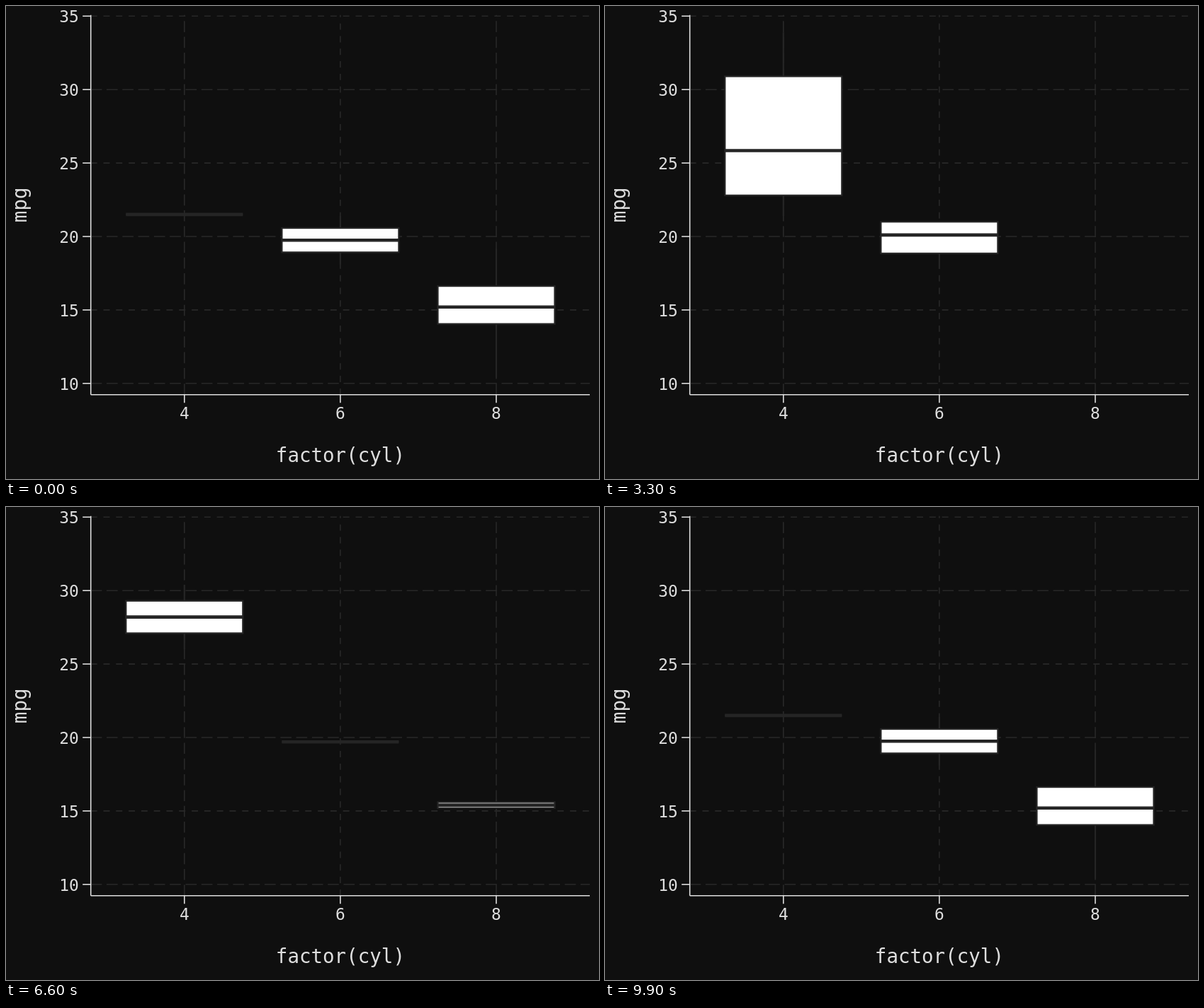
These frames come from a looping animation (837 by 669 pixels, 10 s). An HTML page with a canvas:

```html
<!DOCTYPE html>
<html lang="en">
<head>
<meta charset="utf-8">
<title>Box plots</title>
<style>
  html, body { margin: 0; width: 100%; height: 100%; overflow: hidden; background: #0f0f0f; }
  canvas { display: block; }
</style>
</head>
<body>
<canvas id="chart" width="837" height="669"></canvas>
<script>
const ctx = document.getElementById('chart').getContext('2d');
const LEFT = 119.7, RIGHT = 824, TOP = 12.7, BOTTOM = 549.8;
const INK = '#252525', GRID = '#282828', AXIS = '#dedede';
const FONT = 'px "DejaVu Sans Mono", monospace';
const yOf = v => 14.3 + (35 - v) * 20.78;
const xOf = i => 251.8 + i * 220.1;

// Per state, one box per category: [low, q1, median, q3, high]
const flat = v => Array(5).fill(v);
const states = [
  [flat(21.5), [18.1, 18.925, 19.75, 20.575, 21.4], [10.4, 14.05, 15.2, 16.625, 19.2]],
  [[21.4, 22.8, 25.85, 30.9, 33.9], [17.8, 18.85, 20.1, 21, 21], null],
  [[26, 27.1, 28.2, 29.3, 30.4], flat(19.7), [15, 15.2, 15.4, 15.6, 15.8]]
];
// Linear transitions: [first step, last step], 100 ms per step
const moves = [[16, 33], [49, 66], [83, 99]];

function line(x1, y1, x2, y2, color, width, dash = []) {
  ctx.strokeStyle = color;
  ctx.lineWidth = width;
  ctx.setLineDash(dash);
  ctx.beginPath();
  ctx.moveTo(x1, y1);
  ctx.lineTo(x2, y2);
  ctx.stroke();
}

function label(text, x, y, size, align = 'center') {
  ctx.font = size + FONT;
  ctx.textAlign = align;
  ctx.fillStyle = AXIS;
  ctx.fillText(text, x, y);
}

function drawAxes() {
  const dashOf = i => i % 2 ? [8.9, 8.9] : [15.6, 6.7];
  for (let i = 0; i < 6; i++) {
    const value = 10 + 5 * i, y = yOf(value);
    line(LEFT, y, RIGHT, y, GRID, 1.6, dashOf(i));
    line(108.2, y, LEFT, y, AXIS, 1.6);
    label(value, 102.8, y + 9, 22.9, 'right');
  }
  for (let i = 0; i < 3; i++) {
    const x = xOf(i);
    line(x, BOTTOM, x, TOP, GRID, 1.6, dashOf(i));
    line(x, BOTTOM, x, 561.2, AXIS, 1.6);
    label(4 + 2 * i, x, 584, 22.9);
  }
  line(LEFT, TOP, LEFT, BOTTOM, AXIS, 1.6);
  line(LEFT, BOTTOM, RIGHT, BOTTOM, AXIS, 1.6);
  label('factor(cyl)', 471.9, 644.5, 27.5);
  ctx.save();
  ctx.translate(29, 281.3);
  ctx.rotate(-Math.PI / 2);
  label('mpg', 0, 0, 27.5);
  ctx.restore();
}

function drawBox(stats, x) {
  const [low, q1, median, q3, high] = stats.map(yOf);
  const left = x - 82.5;
  line(x, q3, x, high, INK, 2.2);
  line(x, q1, x, low, INK, 2.2);
  ctx.fillStyle = '#fff';
  ctx.fillRect(left, q3, 165, q1 - q3);
  ctx.strokeRect(left, q3, 165, q1 - q3);
  line(left, median, left + 165, median, INK, 4.6);
}

function boxAt(step, category) {
  let stats = states[0][category];
  moves.forEach(([start, end], i) => {
    if (step <= start) return;
    const from = states[i][category], to = states[(i + 1) % 3][category];
    const p = Math.min(1, (step - start) / (end - start));
    // An unmatched box appears or vanishes only when the transition ends
    if (from && to) stats = from.map((v, k) => v + (to[k] - v) * p);
    else stats = p < 1 ? from : to;
  });
  return stats;
}

function draw(now) {
  const step = Math.floor(now / 100) % 100;
  ctx.fillStyle = '#0f0f0f';
  ctx.fillRect(0, 0, 837, 669);
  drawAxes();
  for (let i = 0; i < 3; i++) {
    const stats = boxAt(step, i);
    if (stats) drawBox(stats, xOf(i));
  }
}

const begin = performance.now();
function tick() {
  draw(performance.now() - begin);
  requestAnimationFrame(tick);
}
tick();
</script>
</body>
</html>
```
